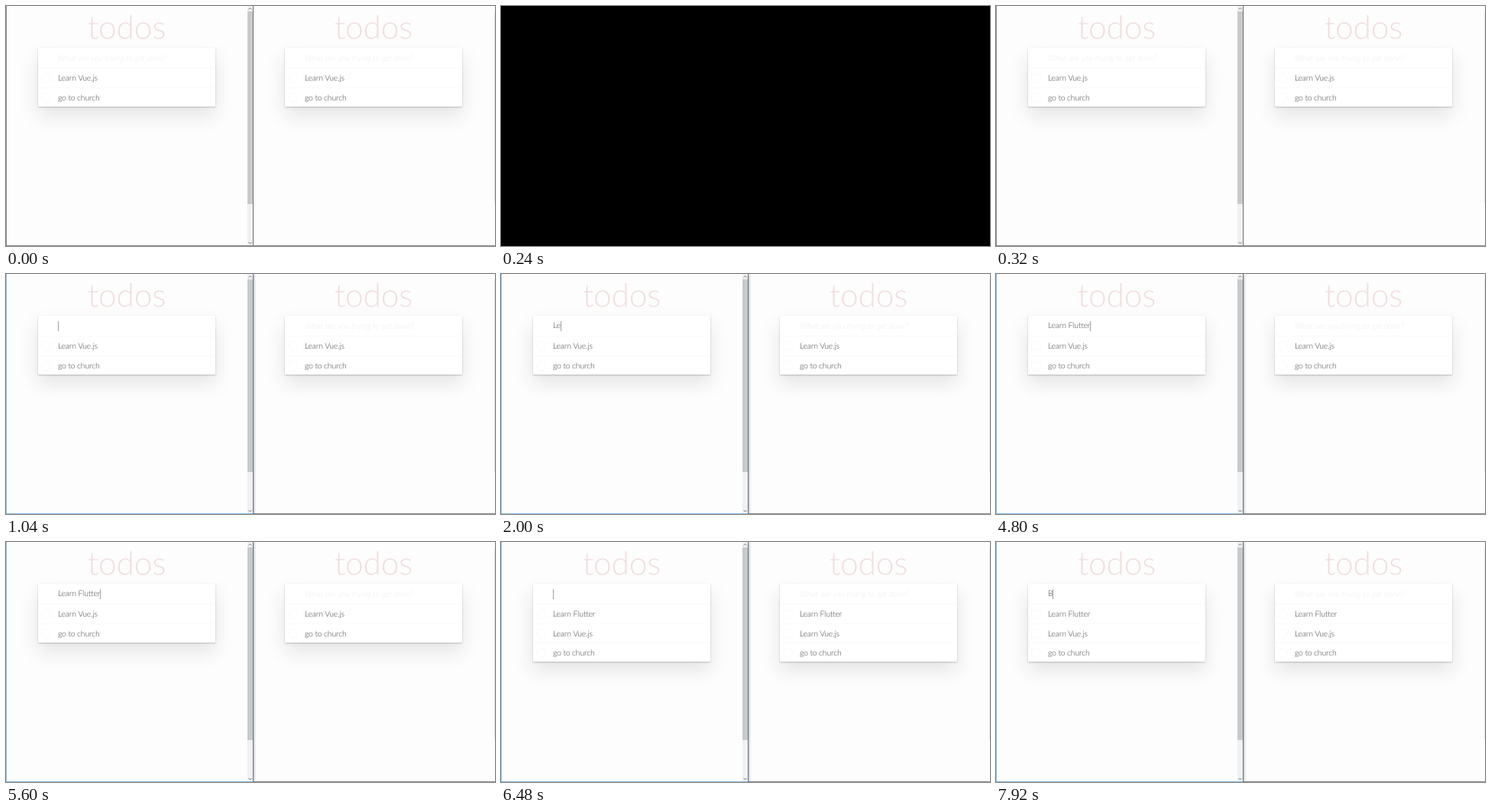
Animation, 640 px wide and 315 px high, one loop 8000 ms. Source, as an HTML page:

```html
<!DOCTYPE html>
<html lang="en">
<head>
<meta charset="utf-8">
<title>todos</title>
<style>
  html, body { margin: 0; width: 100%; height: 100%; overflow: hidden; background: #fdfdfd; }
  #stage {
    position: relative; width: 640px; height: 315px; overflow: hidden;
    font: 300 10.5px Lato, sans-serif; color: #444;
    text-rendering: geometricPrecision; letter-spacing: -.2px;
  }
  .pane, .edge, .bar, .blackout { position: absolute; box-sizing: border-box; }
  .pane { top: 0; width: 324px; height: 315px; overflow: hidden; background: #fdfdfd; }
  .left { left: 0; }
  .right { left: 323px; }

  h1 {
    position: absolute; left: 42px; top: 0; width: 232px; margin: 0;
    font-size: 42.5px; font-weight: 300; line-height: 55px;
    text-align: center; color: rgba(175, 47, 47, .15);
  }
  .card {
    position: absolute; left: 42px; top: 55px; width: 232px; background: #fff;
    box-shadow: 0 1px 2px rgba(0, 0, 0, .22), 0 12px 25px rgba(0, 0, 0, .1);
  }
  .field, .item { position: relative; box-sizing: border-box; padding-left: 26px; white-space: pre; }
  .field { height: 26.4px; line-height: 27.4px; }
  .item { height: 25.2px; line-height: 26.6px; border-top: 1px solid #fafafa; }
  .item::before {
    content: ""; position: absolute; left: 4px; top: 6px; width: 11px; height: 11px;
    border: 1px solid #fafafa; border-radius: 50%;
  }
  .hint {
    position: absolute; left: 26px; top: 0; letter-spacing: 0;
    font-size: 10.7px; font-style: italic; color: #ebebeb;
  }
  .caret {
    position: relative; display: inline-block; width: 0; height: 13px; vertical-align: middle;
  }
  .caret::after {
    content: ""; position: absolute; left: 0; top: 0; width: 1px; height: 13px; background: #98a2ac;
  }

  .bar { left: 316px; top: 0; width: 7px; height: 315px; background: #f1f1f1; }
  .bar i { position: absolute; left: 0; top: 7px; width: 7px; height: 253px; background: #cacaca; }
  .bar svg { position: absolute; left: 0; top: 0; fill: none; stroke: #707070; }

  .edge.l {
    left: 0; top: 0; width: 324px; height: 315px;
    border: solid #8a8a8a; border-width: 0 1px 1px; border-right-color: #6e6e6e;
  }
  .edge.r { left: 324px; top: 0; width: 316px; height: 315px; border-bottom: 1px solid #8a8a8a; }
  .edge.r::after { content: ""; position: absolute; right: 0; top: 7px; width: 1px; height: 253px; background: #e4e4e4; }
  .focus .edge.l {
    border-color: #85bde8; border-right-color: #5d7386;
    box-shadow: 1px 0 3px rgba(0, 0, 0, .28);
  }

  .blackout { inset: 0; background: #000; visibility: hidden; }
  .dark .blackout { visibility: visible; }
  [hidden] { display: none; }
</style>
</head>
<body>
<div id="stage">
  <div class="pane right"></div>
  <div class="pane left"></div>
  <div class="bar">
    <i></i>
    <svg width="7" height="315"><path d="M1.5 4.5l2-2 2 2M1.5 310l2 2 2-2"/></svg>
  </div>
  <div class="edge r"></div>
  <div class="edge l"></div>
  <div class="blackout"></div>
</div>
<script>
  const LOOP = 8000, ADDED = 5760;
  const stage = document.getElementById('stage');
  const panes = stage.querySelectorAll('.pane');

  for (const pane of panes) {
    pane.innerHTML = `<h1>todos</h1>
      <div class="card">
        <div class="field"><span class="hint">What are you trying to get done?</span><span class="typed"></span><span class="caret" hidden></span></div>
        <div class="item new" hidden>Learn Flutter</div>
        <div class="item">Learn Vue.js</div>
        <div class="item">go to church</div>
      </div>`;
  }

  const left = panes[1];
  const hint = left.querySelector('.hint');
  const typed = left.querySelector('.typed');
  const caret = left.querySelector('.caret');
  const added = stage.querySelectorAll('.new');

  // [time, typed text, caret shown]
  const steps = [
    [0, '', 0], [1040, '', 1], [1360, '', 0],
    [1760, 'L', 0], [1840, 'L', 1], [2000, 'Le', 1], [2080, 'Lear', 1],
    [2240, 'Learn', 0], [2400, 'Learn ', 1], [2720, 'Learn F', 1],
    [3120, 'Learn Fl', 1], [3280, 'Learn Flu', 1], [3360, 'Learn Flut', 1],
    [3520, 'Learn Flutt', 0], [3600, 'Learn Flutt', 1],
    [3920, 'Learn Flutte', 1], [4000, 'Learn Flutter', 1],
    [4320, 'Learn Flutter', 0], [4800, 'Learn Flutter', 1],
    [5200, 'Learn Flutter', 0], [5600, 'Learn Flutter', 1],
    [ADDED, '', 1], [6080, '', 0], [6480, '', 1], [6880, '', 0],
    [7360, '', 1], [7760, '', 0], [7920, 'B', 1]
  ];

  function render(t) {
    const [, text, on] = steps.findLast(s => s[0] <= t);
    if (typed.textContent !== text) typed.textContent = text;
    caret.hidden = !on;
    hint.hidden = t >= 960;
    for (const item of added) item.hidden = t < ADDED;
    stage.classList.toggle('focus', t >= 960);
    stage.classList.toggle('dark', t >= 240 && t < 320);
  }

  const start = performance.now();
  function tick() {
    render((performance.now() - start) % LOOP);
    requestAnimationFrame(tick);
  }
  tick();
</script>
</body>
</html>
```
